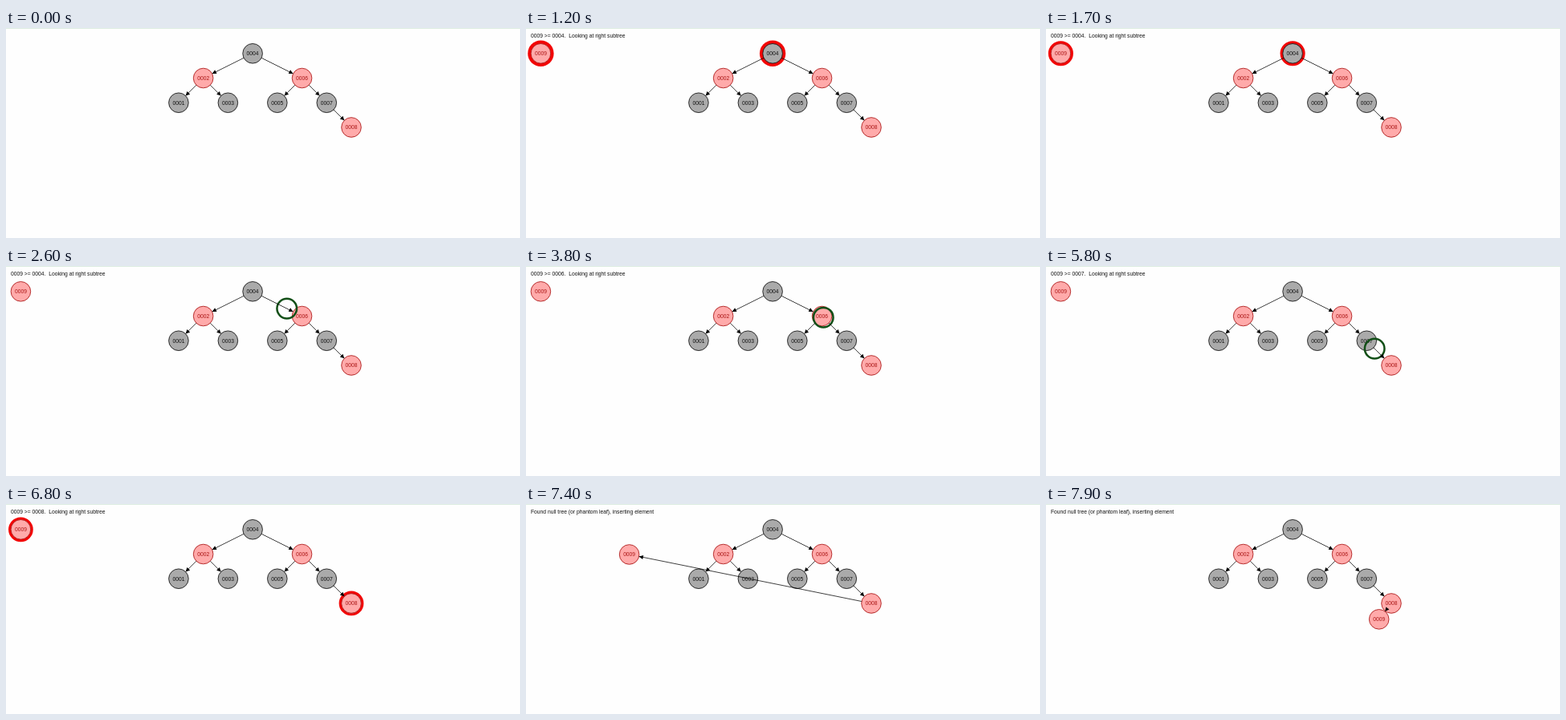
An HTML page with a canvas for the animation above (8000 ms loop, 640 by 262 pixels).

```html
<!DOCTYPE html>
<html lang="en">
<head>
<meta charset="utf-8">
<title>Tree insertion</title>
<style>
html, body { margin: 0; width: 100%; height: 100%; overflow: hidden; background: #fefefe; }
canvas { display: block; }
</style>
</head>
<body>
<canvas id="stage" width="640" height="262"></canvas>
<script>
const ctx = document.getElementById('stage').getContext('2d');
const LOOP = 8000, TICK = 100;
const APPEAR = 100;   // new node and first message
const START = 1106;   // first comparison
const STEP = 882;     // length of one animation block
const UNIT = 30.72, R = 12.3;
const RED = { fill: '#ffaaaa', line: '#aa1515' };
const BLACK = { fill: '#aaaaaa', line: '#111111' };
const FONT = '6.74px "Liberation Sans", Arial, sans-serif';

// column and level are counted from the root
const node = (value, col, level, paint) =>
  ({ value, x: 307.1 + col * UNIT, y: 31.8 + level * UNIT, paint });

const tree = [
  node(1, -3, 2, BLACK), node(2, -2, 1, RED), node(3, -1, 2, BLACK),
  node(4, 0, 0, BLACK), node(5, 1, 2, BLACK), node(6, 2, 1, RED),
  node(7, 3, 2, BLACK), node(8, 4, 3, RED)
];
const at = value => tree[value - 1];
const links = [[4, 2], [4, 6], [2, 1], [2, 3], [6, 5], [6, 7], [7, 8]];
const path = [4, 6, 7, 8].map(at);
const home = { x: 18.4, y: 31.8 };
// two simultaneous moves pull the new node towards the middle of their goals
const goal = { x: at(8).x + UNIT * 0.75, y: at(8).y + UNIT };

const pad = n => String(n).padStart(4, '0');
const mix = (a, b, k) => ({ x: a.x + (b.x - a.x) * k, y: a.y + (b.y - a.y) * k });

function circle(p, r) {
  ctx.beginPath();
  ctx.arc(p.x, p.y, r, 0, Math.PI * 2);
}

function text(str, x, y, color, align) {
  ctx.font = FONT;
  ctx.textAlign = align;
  ctx.textBaseline = 'alphabetic';
  ctx.fillStyle = color;
  ctx.fillText(str, x, y);
}

function drawNode(n, glow) {
  if (glow) {
    circle(n, R + glow);
    ctx.fillStyle = '#f20505';
    ctx.fill();
  }
  circle(n, R);
  ctx.fillStyle = n.paint.fill;
  ctx.fill();
  ctx.strokeStyle = n.paint.line;
  ctx.lineWidth = 0.85;
  ctx.stroke();
  text(pad(n.value), n.x, n.y + 2.4, n.paint.line, 'center');
}

function drawLink(a, b) {
  const d = Math.hypot(b.x - a.x, b.y - a.y);
  const from = mix(a, b, R / d), tip = mix(b, a, R / d);
  const ux = (b.x - a.x) / d, uy = (b.y - a.y) / d;
  const bx = tip.x - ux * 5.2, by = tip.y - uy * 5.2, w = 2.6;
  ctx.strokeStyle = ctx.fillStyle = '#000';
  ctx.lineWidth = 0.75;
  ctx.beginPath();
  ctx.moveTo(from.x, from.y);
  ctx.lineTo(tip.x, tip.y);
  ctx.stroke();
  ctx.beginPath();
  ctx.moveTo(tip.x, tip.y);
  ctx.lineTo(bx - uy * w, by + ux * w);
  ctx.lineTo(bx + uy * w, by - ux * w);
  ctx.fill();
}

// triangle wave between the thin and the thick outline
function pulse(t) {
  const period = 1680, peak = 1340;
  const phase = (((t - peak) / period) % 1 + 1) % 1;
  return 1.85 + 2.46 * Math.abs(1 - 2 * phase);
}

function message(t, block) {
  if (t < APPEAR) return '';
  if (block < 0) return 'Inserting 0009';
  if (block >= 7) return 'Found null tree (or phantom leaf), inserting element';
  return `0009 >= ${pad(path[block >> 1].value)}.  Looking at right subtree`;
}

function draw(t) {
  const block = Math.floor((t - START) / STEP);
  const k = (t - START) / STEP - block;
  const comparing = block >= 0 && block < 7 && block % 2 === 0;
  const walking = block > 0 && block < 7 && block % 2 === 1;
  const landing = block >= 7;
  const current = comparing ? path[block >> 1] : null;
  const glow = comparing ? pulse(t) : 0;

  ctx.fillStyle = '#fefefe';
  ctx.fillRect(0, 0, 640, 262);
  ctx.fillStyle = '#dcebe1';
  ctx.fillRect(0, 0, 640, 1);

  text(message(t, block), 6, 12.3, '#111', 'left');
  tree.forEach(n => drawNode(n, n === current ? glow : 0));

  const place = landing ? mix(home, goal, 1 - (1 - k) ** 2) : home;
  const fresh = { value: 9, paint: RED, ...place };
  if (t >= APPEAR) drawNode(fresh, glow);

  if (walking) {
    const i = block >> 1;
    circle(mix(path[i], path[i + 1], k), R);
    ctx.strokeStyle = '#124f17';
    ctx.lineWidth = 2.5;
    ctx.stroke();
  }

  links.forEach(([a, b]) => drawLink(at(a), at(b)));
  if (landing) drawLink(at(8), fresh);
}

const begin = performance.now();
function frame() {
  const t = (performance.now() - begin) % LOOP;
  draw(Math.floor(t / TICK) * TICK);
  requestAnimationFrame(frame);
}
frame();
</script>
</body>
</html>
```
